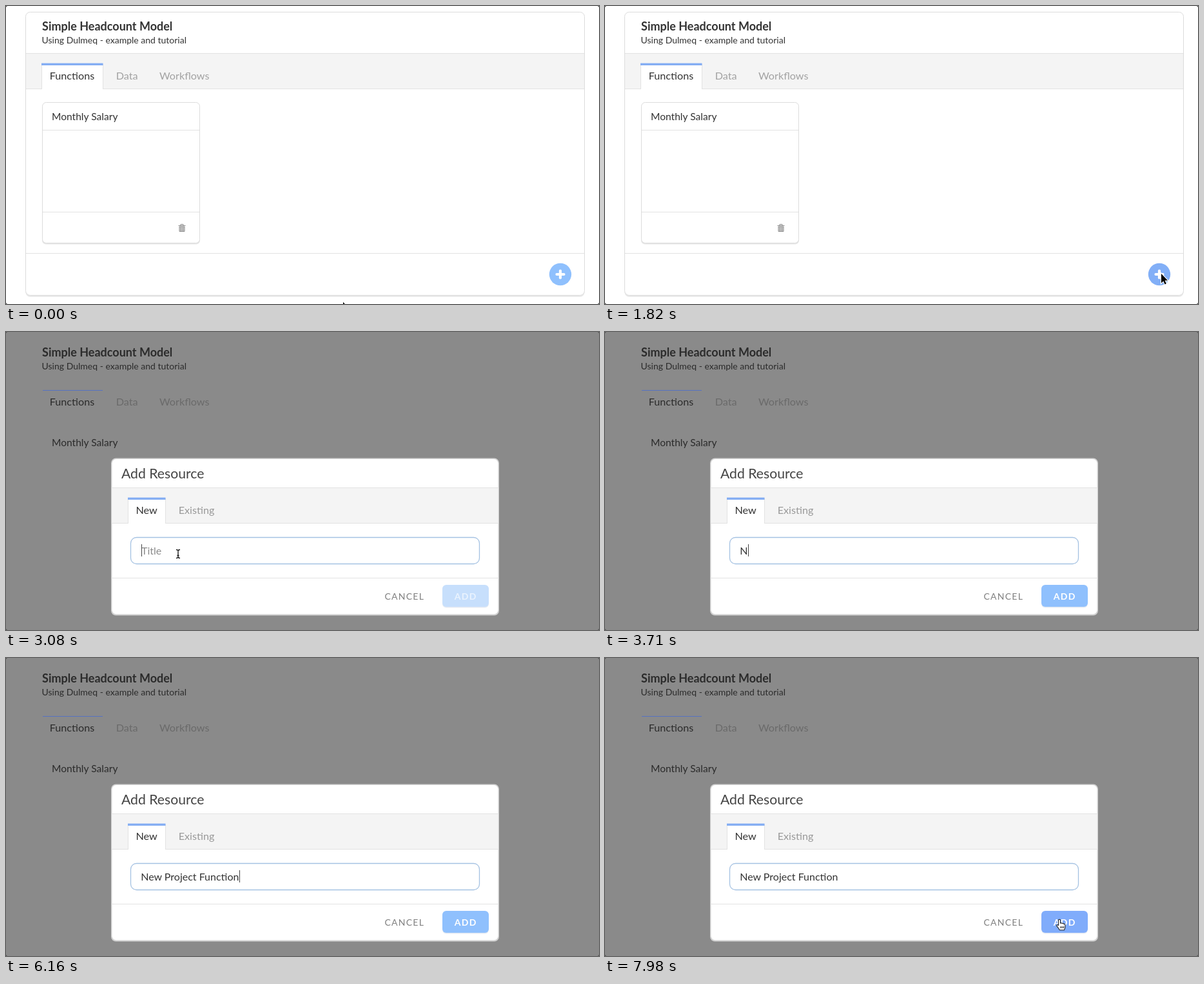
Write an HTML page that moves like this. It is 920 by 462 pixels and loops after 8000 ms.

```html
<!DOCTYPE html>
<html lang="en">
<head>
<meta charset="utf-8">
<title>Add Resource</title>
<style>
html, body { margin: 0; width: 100%; height: 100%; overflow: hidden; background: #fff; }
svg { display: block; width: 920px; height: 462px; font: 16px Lato, "Open Sans", sans-serif; }
.line { stroke: #e2e2e2; fill: none; }
.card { fill: #fff; stroke: #dcdcdc; }
.band { fill: #f4f4f4; }
.accent { fill: #85aef3; }
.ink { fill: #333; }
.muted { fill: #a2a2a2; }
.tab { font-size: 16.2px; }
.dim .ink { fill: #2b2b2b; }
.dim .muted { fill: #6a6a6a; }
.caps { font-size: 14px; letter-spacing: 1.25px; }
.hidden { display: none; }
</style>
</head>
<body>
<svg viewBox="0 0 920 462">
  <rect id="backdrop" width="920" height="462" fill="#fff"/>

  <g id="page">
    <g id="pageShapes">
      <rect x="30.5" y="11" width="867" height="440" rx="7" fill="#e9e9e9"/>
      <rect class="card" x="30.5" y="9.5" width="867" height="439" rx="7"/>
      <rect class="band" x="31" y="74" width="866" height="54"/>
      <path class="line" d="M31 73.5H897M31 128.5H897M31 383.5H897"/>
      <path d="M55.5 129V90H150.5V129" fill="#fff" stroke="#e2e2e2"/>
      <rect class="accent" x="55" y="88.6" width="95.5" height="3.4"/>
      <rect x="56" y="151" width="245" height="218.5" rx="6" fill="#e6e6e6"/>
      <rect class="card" x="56.5" y="149.5" width="244" height="218" rx="6"/>
      <path class="line" d="M57 192.5H300M57 319.5H300"/>
      <g fill="none" stroke="#8c8c8c">
        <path d="M267.5 340.5H278.5M271 340V338.5H275V340"/>
        <path d="M269 342H277V349.5H269ZM271.5 343V349M274.5 343V349" fill="#cfcfcf"/>
      </g>
      <circle id="plusButton" cx="860" cy="416" r="17.2"/>
      <path d="M860 410.5V421.5M854.5 416H865.5" stroke="#fff" stroke-width="4.2" stroke-linecap="round"/>
    </g>
    <path id="dimAccent" d="M57 90.5H150" stroke="#5672c2"/>
    <text class="ink" x="56.1" y="37.5" font-size="18" font-weight="700">Simple Headcount Model</text>
    <text class="ink" x="55.6" y="58" font-size="14">Using Dulmeq - example and tutorial</text>
    <text class="ink tab" x="67.7" y="114">Functions</text>
    <text class="muted tab" x="170.7" y="114">Data</text>
    <text class="muted tab" x="238" y="114">Workflows</text>
    <text class="ink" x="70.9" y="177" font-size="15.6">Monthly Salary</text>
  </g>

  <g id="modal">
    <rect x="163" y="195.5" width="602" height="244" rx="7.5" fill="#d2d2d2"/>
    <rect x="164.5" y="197" width="599" height="240.5" rx="6.5" fill="#fff"/>
    <rect class="band" x="164.5" y="242" width="599" height="54"/>
    <path class="line" d="M164.5 241.5H763.5M164.5 296.5H763.5M164.5 381.5H763.5"/>
    <path d="M189.5 297V258H247.5V297" fill="#fff" stroke="#e2e2e2"/>
    <rect class="accent" x="189" y="256.6" width="58.5" height="3.4"/>
    <text x="179" y="227" font-size="21.2" fill="#444">Add Resource</text>
    <text class="ink tab" x="201.4" y="282">New</text>
    <text class="tab" x="267.7" y="282" fill="#999">Existing</text>
    <rect id="field" x="193.5" y="318.5" width="541" height="41" rx="9" fill="#fff" stroke-width="1.3"/>
    <text id="placeholder" x="210" y="345" fill="#8a8a8a">Title</text>
    <text id="typed" class="ink" x="209.2" y="345"></text>
    <rect id="caret" y="329" width="1" height="19" fill="#444"/>
    <text class="caps" x="587.5" y="415" fill="#808080">CANCEL</text>
    <rect x="677" y="393" width="72" height="34.5" rx="6" fill="#e3eaf3"/>
    <rect id="addButton" x="677" y="392" width="72" height="34" rx="6"/>
    <text id="addLabel" class="caps" x="695.8" y="415" font-weight="700">ADD</text>
  </g>

  <path d="M0 0H2L0 2ZM920 0H918L920 2ZM0 462H2L0 460ZM920 462H918L920 460Z" fill="#555"/>
  <circle id="clickRing" cx="862" cy="415" r="30" fill="none" stroke="#777" stroke-opacity=".6" stroke-width="2"/>

  <g id="cursor">
    <path id="arrow" d="M0 0V14.4L3.3 11.4L5.6 16.4L7.8 15.4L5.6 10.6H10Z" fill="#000" stroke="#fff" stroke-width="2.2" paint-order="stroke"/>
    <g id="beam" fill="none">
      <path d="M-3-6.5Q0-6.5 0-4.5Q0-6.5 3-6.5M0-5V5M-3 6.5Q0 6.5 0 4.5Q0 6.5 3 6.5M-1.5 2.5H1.5" stroke="#fff" stroke-width="3"/>
      <path d="M-3-6.5Q0-6.5 0-4.5Q0-6.5 3-6.5M0-5V5M-3 6.5Q0 6.5 0 4.5Q0 6.5 3 6.5M-1.5 2.5H1.5" stroke="#111" stroke-width="1.3"/>
    </g>
    <path id="hand" d="M-1.5 1.2Q0-.8 1.5 1.2V6.2Q3 5 4.2 6.6Q5.8 5.6 6.8 7.4Q8.8 6.8 8.8 9V12Q8.8 14 7.5 16.8H.3Q-1.5 13.5-4.4 10.2Q-4.2 7.8-1.5 9.5ZM2 11V14M4.2 11V14M6.4 11V14" fill="#fff" stroke="#222" stroke-width="1.1" stroke-linejoin="round"/>
  </g>
</svg>

<script>
const LOOP = 8000, STEP = 70;
const OPEN = 1890, FIRST_KEY = 3500, CURSOR_BACK = 6580;
const TITLE = 'New Project Function';
const KEY_TIMES = [
  FIRST_KEY, 4060, 4130, 4200,
  4340, 4480, 4550, 4620, 4760, 4830, 5040, 5180,
  5390, 5530, 5600, 5740, 5810, 5950, 6020, 6160,
];
// time, x, y of the pointer tip
const PATH = [
  [0, 523, 459], [700, 863, 415], [OPEN, 863, 415], [2590, 267, 344],
  [CURSOR_BACK - STEP, 267, 344], [7420, 853, 412], [7910, 705, 405], [LOOP, 705, 405],
];

const el = Object.fromEntries([...document.querySelectorAll('[id]')].map(n => [n.id, n]));
const show = (node, on) => node.classList.toggle('hidden', !on);
const clamp = v => Math.min(1, Math.max(0, v));
const ease = u => u * u * (3 - 2 * u);
const mix = (a, b, u) => a + (b - a) * u;
const blend = (a, b, u) => `rgb(${a.map((v, i) => Math.round(mix(v, b[i], u)))})`;
const inside = ([x, y], left, top, right, bottom) =>
  x >= left && x <= right && y >= top && y <= bottom;

function pointerAt(t) {
  const i = PATH.findIndex(p => p[0] > t);
  const [t0, x0, y0] = PATH[i - 1], [t1, x1, y1] = PATH[i];
  const u = ease((t - t0) / (t1 - t0));
  return [mix(x0, x1, u), mix(y0, y1, u)];
}

function drawPage(t, pointer, open) {
  el.page.classList.toggle('dim', open);
  el.backdrop.setAttribute('fill', open ? '#8a8a8a' : '#fff');
  show(el.pageShapes, !open);
  show(el.dimAccent, open);
  const hover = Math.hypot(pointer[0] - 860, pointer[1] - 416) < 17;
  el.plusButton.setAttribute('fill', hover ? '#82aff7' : '#8fc0fd');
  show(el.clickRing, t >= 1610 && t < 1820);
}

function drawModal(t, overAdd) {
  const count = KEY_TIMES.filter(k => k <= t).length;
  el.typed.textContent = TITLE.slice(0, count).replaceAll(' ', '\u00a0');
  show(el.placeholder, !count);

  const lastKey = count ? KEY_TIMES[count - 1] : OPEN;
  const textWidth = count ? el.typed.getComputedTextLength() : 0;
  el.caret.setAttribute('x', Math.round(209.6 + textWidth));
  show(el.caret, (t - lastKey) % 1000 < 500);

  el.field.setAttribute('stroke', blend([172, 190, 196], [165, 194, 226], clamp((t - OPEN) / 280)));
  const enabled = clamp((t - FIRST_KEY + STEP) / 140);
  el.addButton.setAttribute('fill',
    overAdd && enabled ? '#80acfb' : blend([199, 223, 252], [143, 192, 253], enabled));
  el.addLabel.setAttribute('fill', blend([234, 243, 254], [255, 255, 255], enabled));
}

function drawCursor(t, pointer, open, overAdd) {
  const overField = open && inside(pointer, 193, 318, 735, 360);
  show(el.cursor, t < FIRST_KEY || t >= CURSOR_BACK);
  el.cursor.setAttribute('transform', `translate(${pointer.map(v => v.toFixed(1))})`);
  show(el.beam, overField);
  show(el.hand, overAdd);
  show(el.arrow, !overField && !overAdd);
}

function render(time) {
  const t = Math.floor((time % LOOP) / STEP) * STEP;
  const pointer = pointerAt(t);
  const open = t >= OPEN;
  const overAdd = t >= CURSOR_BACK && inside(pointer, 677, 392, 749, 426);
  drawPage(t, pointer, open);
  show(el.modal, open);
  if (open) drawModal(t, overAdd);
  drawCursor(t, pointer, open, overAdd);
}

let start;
function tick(now) {
  start ??= now;
  render(now - start);
  requestAnimationFrame(tick);
}
render(0);
requestAnimationFrame(tick);
</script>
</body>
</html>
```
